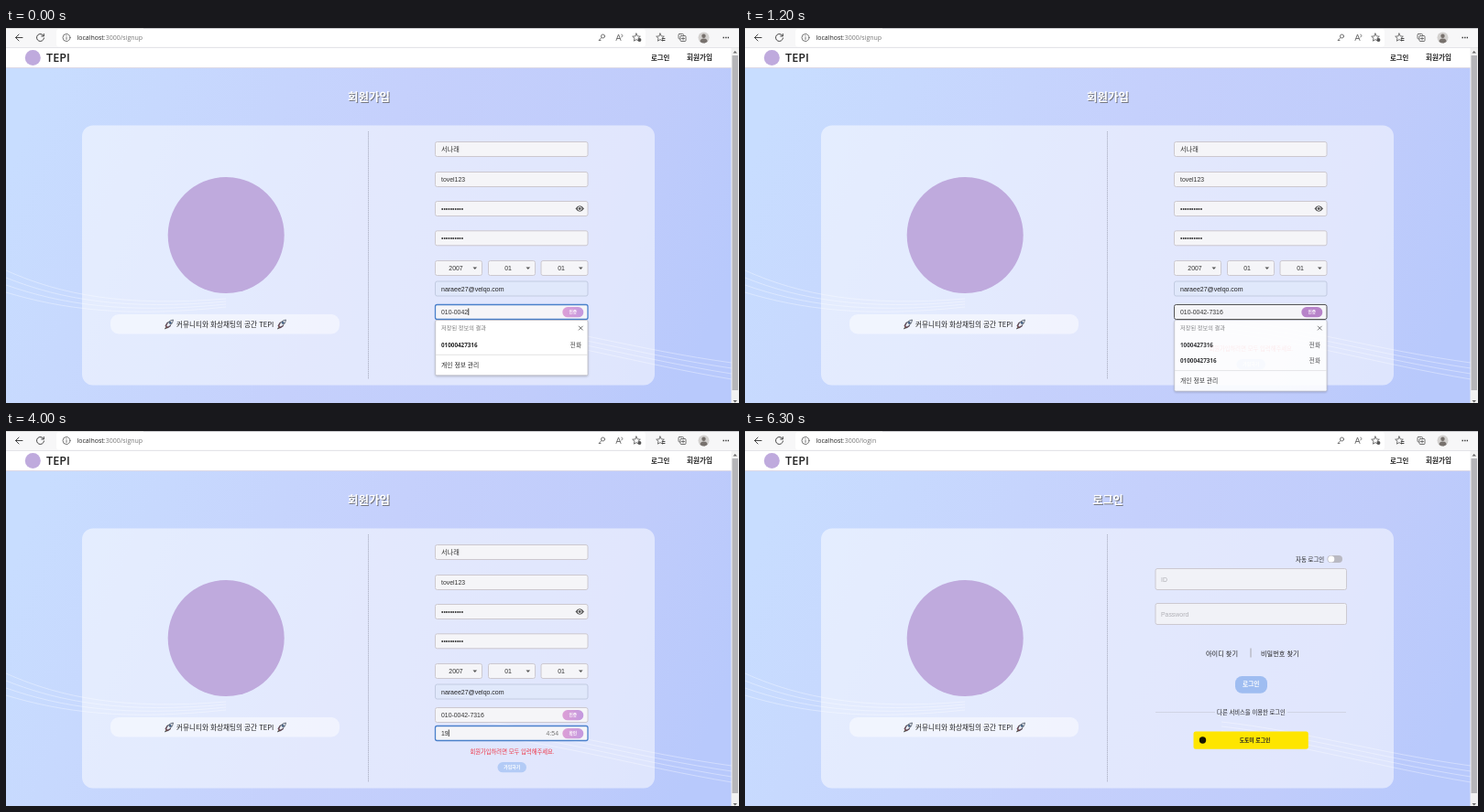
Animation, 800 px wide and 410 px high, one loop 6.4 s. Source, as an HTML page:

```html
<!DOCTYPE html>
<html lang="ko">
<head>
<meta charset="utf-8">
<title>TEPI</title>
<style>
html, body { margin: 0; width: 100%; height: 100%; overflow: hidden; background: #c4d2fc; }
svg { display: block; }
text { font-family: "Noto Sans CJK KR", "Noto Sans CJK", sans-serif; fill: #222; white-space: pre; }
.latin { font-family: "Liberation Sans", sans-serif; }
.ui { font-family: "Open Sans", sans-serif; }
.bold { font-weight: 700; }
.mid { text-anchor: middle; }
.end { text-anchor: end; }
.title { filter: drop-shadow(1px 1px .7px #555b); }
.icon { fill: none; stroke: #666; stroke-width: .9; stroke-linecap: round; stroke-linejoin: round; }
</style>
</head>
<body>
<svg width="800" height="410" viewBox="0 0 800 410">
  <defs>
    <linearGradient id="sky" x1="0" y1=".4" x2="1" y2=".6">
      <stop offset="0" stop-color="#c8ddff"/>
      <stop offset=".48" stop-color="#c5d0fc"/>
      <stop offset=".8" stop-color="#c0ccfb"/>
      <stop offset="1" stop-color="#b8c9fc"/>
    </linearGradient>
    <linearGradient id="pink" x2="1">
      <stop offset="0" stop-color="#dd9fd6"/>
      <stop offset="1" stop-color="#c399df"/>
    </linearGradient>
    <g id="rocket" stroke="#333b4a" stroke-width=".7">
      <path d="M-4 5L-1.800 1.200 0 3Z" fill="#f2a03d"/>
      <path d="M-3.500 1.500L-1.500-2H1.500L2 2-1.500 4Z" fill="#d8434e"/>
      <path d="M-2.500 1.500Q-1-4 5-5Q4 1-1.200 3Z" fill="#e9eef5"/>
      <circle cx="1.700" cy="-1.700" r="1.100" fill="#3f79b8"/>
    </g>
  </defs>

  <rect width="800" height="410" fill="url(#sky)"/>
  <g id="waves" fill="none" stroke="#fff" stroke-width=".9" opacity=".4"></g>

  <rect width="800" height="22" fill="#f7f7f8"/>
  <rect x="55" y="1" width="643" height="19.500" rx="3" fill="#fff"/>
  <rect y="22" width="800" height="21.500" fill="#fff"/>
  <path d="M0 .5H150" stroke="#ddd"/>
  <path d="M150 .5H800" stroke="#c9c9cc"/>
  <path d="M0 21.500H800" stroke="#e4e4e8"/>
  <path d="M0 43.500H792" stroke="#dcd9e6"/>
  <g class="icon">
    <path d="M18 10.500H10.500M14 7L10.500 10.500 14 14" stroke="#333"/>
    <path d="M41 8.500A4 4 0 1 0 41.500 11M41.300 6.500V9H38.800" stroke="#333"/>
    <circle cx="66" cy="10.500" r="4"/><path d="M66 10V12.500M66 8.300V8.400"/>
    <circle cx="651.500" cy="9" r="2"/><path d="M650 10.500L647 13.500H649"/>
    <path d="M666 13.500L668.500 7 671 13.500M667 11.500H670M672 7Q674 8.500 672 10"/>
    <path id="star" d="M688 6L689.300 8.900 692.300 9.200 690 11.200 690.700 14.200 688 12.600 685.300 14.200 686 11.200 683.700 9.200 686.700 8.900Z"/>
    <use href="#star" x="26"/>
    <path d="M716.500 11.500H719M716.500 13.500H719" stroke="#333"/>
    <rect x="734" y="6.500" width="5.500" height="5.500" rx="1"/>
    <rect x="736" y="8.500" width="6" height="6" rx="1" fill="#f7f7f8"/><path d="M739 10V13M737.500 11.500H740.500"/>
  </g>
  <circle cx="691.500" cy="13" r="1.900" fill="#555"/>
  <circle cx="761.500" cy="10.500" r="6" fill="#d3d1cf"/>
  <circle cx="761.500" cy="8.700" r="2.200" fill="#77716d"/>
  <path d="M757.500 15Q757.500 11.500 761.500 11.500T765.500 15Q761.500 18 757.500 15" fill="#77716d"/>
  <path d="M782.500 10.500H789" stroke="#333" stroke-width="1.400" stroke-dasharray="1.400 1.200"/>

  <circle cx="29.300" cy="32.500" r="8.500" fill="#bfaadd"/>
  <text class="ui" x="44" y="36.800" font-size="12.600" font-weight="600">TEPI</text>
  <text class="bold" x="704" y="34.700" font-size="7.400">로그인</text>
  <text class="bold" x="743" y="34.700" font-size="7.600">회원가입</text>

  <rect x="791.500" y="22" width="8.500" height="388" fill="#f1f1f1"/>
  <rect x="792.500" y="30" width="6.500" height="366" fill="#b5b5b8"/>
  <path d="M793.500 27.500L795.700 25 798 27.500ZM793.500 407L795.700 409.500 798 407Z" fill="#666"/>

  <rect x="83" y="106.500" width="625" height="284" rx="12" fill="#fff" opacity=".52"/>
  <path d="M395.500 113V384" stroke="#a7abbe" stroke-width=".8" stroke-dasharray="1.500 .7"/>
  <circle cx="240.200" cy="226.500" r="63.500" fill="#bfaadd"/>
  <rect x="114" y="313" width="250" height="21.500" rx="9" fill="#fff" opacity=".5"/>
  <use href="#rocket" x="177.500" y="324"/>
  <use href="#rocket" x="300.500" y="324"/>
  <text x="186" y="326.700" font-size="7.600">커뮤니티와 화상채팅의 공간 TEPI</text>

  <text class="ui" x="77.500" y="13" font-size="7">localhost<tspan id="path" fill="#777" style="fill:#777"></tspan></text>
  <g id="page"></g>
</svg>
<script>
const LOOP = 6400;
const PHONE = '010-0042-7316', DIGITS = '01000427316', CODE = '198919';
const PHONE_KEYS = [200, 300, 400, 500, 600];
const CODE_KEYS = [3700, 3900, 4200, 4400, 4600, 4800];
const CODE_SHOWN = 1300, CODE_FOCUS = 3200, CONFIRMED = 5300, LOGIN = 5800;

const text = (x, y, size, str, cls = '', fill = '#222') =>
  `<text x="${x}" y="${y}" font-size="${size}" class="${cls}" style="fill:${fill}">${str}</text>`;
const rect = (x, y, w, h, r, fill, more = '') =>
  `<rect x="${x}" y="${y}" width="${w}" height="${h}" rx="${r}" fill="${fill}" ${more}/>`;
const line = (d, color) => `<path d="${d}" fill="none" stroke="${color}" stroke-width=".8"/>`;
const box = (x, y, w, h, border = '#c9c5cb', fill = '#f5f5f8', width = .9) =>
  rect(x, y, w, h, 2, fill, `stroke="${border}" stroke-width="${width}"`);
const pill = (x, y, w, h, fill, label, size = 4.7) =>
  rect(x, y, w, h, h / 2, fill) +
  text(x + w / 2, y + h / 2 + size * .37, size, label, 'mid bold', '#fff');
const typed = (keys, t) => keys.filter(k => t >= k).length;

// Input row of the sign-up form: idle, hovered or focused
function field(y, str, mode = 'idle', cls = 'latin') {
  const border = { idle: '#c9c5cb', hover: '#444', focus: '#4a80cb' }[mode];
  return box(468.5, y, 166.5, 16, border, '#f5f5f8', mode == 'focus' ? 1.3 : .9) +
    text(475, y + 10.4, cls ? 6.9 : 7.2, str, cls, '#333');
}

function caret(str, y) {
  const width = [...str].reduce((sum, c) => sum + (c == '-' ? .333 : .556) * 6.9, 0);
  return line(`M${475.6 + width} ${y}v7.500`, '#111');
}

function dropdown(header, items, kind, manage, opacity) {
  const itemsEnd = 340 + items.length * 17.3;
  const bottom = manage ? itemsEnd + 22.5 : itemsEnd;
  let out = rect(468.7, 319.5, 166.3, bottom - 319.5, 1.5, '#fff',
    'stroke="#bcbcc4" stroke-width=".8" style="filter:drop-shadow(0 1px 1px #0003)"');
  out += text(manage ? 475 : 477, 330.4, 6.2, header, '', '#777');
  out += line('M625 325.800l4.600 4.600m0-4.600l-4.600 4.600', '#444');
  items.forEach((item, i) => {
    const y = 348.6 + i * 17.2;
    out += text(475, y, 6.3, item, kind ? 'ui bold' : 'ui');
    out += text(628, y, 6.6, kind, 'end', '#444');
  });
  if (manage)
    out += line(`M469 ${itemsEnd}H635`, '#ddd') + text(475, itemsEnd + 13.3, 6.8, '개인 정보 관리');
  return `<g opacity="${opacity}">${out}</g>`;
}

function suggestions(t) {
  if (t < 200) return dropdown('저장된 정보의 결과', [DIGITS], '전화', true, 1);
  if (t < 600) return dropdown('저장된 데이터', [PHONE], '', false, 1);
  const fade = Math.min(1, (1300 - t) / 110);
  return fade > 0
    ? dropdown('저장된 정보의 결과', [DIGITS.slice(1), DIGITS], '전화', true, fade) : '';
}

function codeRow(t) {
  const code = CODE.slice(0, typed(CODE_KEYS, t));
  const focused = t >= CODE_FOCUS && t < 5100;
  const left = 59 - Math.floor((Math.min(t, CONFIRMED) - CODE_SHOWN) / 500);
  return field(322.5, code, focused ? 'focus' : 'idle') +
    (code || focused ? '' : text(475, 333, 7.2, '인증번호', '', '#a3a3ab')) +
    (focused && t < 4850 ? caret(code, 326.5) : '') +
    text(603, 332.9, 6.9, '4:' + left, 'latin end', '#777') +
    pill(607.3, 325, 23, 11.3, 'url(#pink)', '확인');
}

function signup(t) {
  const dots = '•'.repeat(10);
  const phone = PHONE.slice(0, 8 + typed(PHONE_KEYS, t));
  const mode = t < 1000 ? 'focus' : t < 1700 ? 'hover' : 'idle';
  const done = t >= CONFIRMED;
  let out = text(396, 80.3, 12.5, '회원가입', 'mid bold title', '#fff');
  out += field(124.5, '서나래', 'idle', '') + field(157.5, 'tovel123');
  out += field(189.5, dots) + field(221.8, dots);
  out += '<path d="M621.500 197.500Q626.200 191 631 197.500Q626.200 204 621.500 197.500" fill="#555"/>' +
    '<circle cx="626.200" cy="197.500" r="1.900" fill="#555" stroke="#f5f5f8"/>';
  [['2007', 468.5, 491], ['01', 526.5, 548], ['01', 584, 606]].forEach(([str, x, mid]) => {
    out += box(x, 254.5, 51, 16) + text(mid, 264.8, 6.9, str, 'latin mid', '#333');
    out += `<path d="M${x + 41} 261.500h4.600l-2.300 2.400Z" fill="#555"/>`;
  });
  out += box(468.5, 277, 166.5, 16, '#bfc8de', '#e0e8fb') +
    text(475, 287.5, 7, 'naraee27@velqo.com', 'latin');
  out += field(302.5, phone, mode) + (mode == 'focus' ? caret(phone, 306.5) : '');
  out += pill(607.3, 305, 23, 11.3, mode == 'hover' ? '#b783c9' : 'url(#pink)', '인증');
  if (t >= CODE_SHOWN) out += codeRow(t);
  if (!done) out += text(552.5, 353.4, 6.3, '회원가입하려면 모두 입력해주세요.', 'mid', '#ee3344');
  out += pill(536.5, 362, 31.5, 11.3, done ? '#9dbcf2' : '#b3cbf6', '가입하기', 4.9);
  return out + suggestions(t);
}

function login() {
  let out = text(396, 80.3, 12.2, '로그인', 'mid bold title', '#fff');
  out += text(601, 142.5, 6.4, '자동 로그인');
  out += rect(635.5, 136, 16.5, 8, 4, '#b9b9c2') + '<circle cx="639.800" cy="140" r="3.500" fill="#fff"/>';
  [['ID', 150.5], ['Password', 188.5]].forEach(([label, y]) => {
    out += box(448, y, 208.5, 23, '#c9c6cc', '#f1f2f7') + text(454, y + 14, 6.9, label, 'latin', '#b0b0b6');
  });
  out += text(503, 245.6, 7.2, '아이디 찾기') + line('M552 237.500V247.500', '#999') +
    text(563, 245.6, 7.2, '비밀번호 찾기');
  out += rect(535, 268, 35, 18.7, 7.5, '#9fbdf1') + text(552.3, 279.4, 6.7, '로그인', 'mid bold', '#fff');
  out += line('M448 307.500H513M592 307.500H656', '#ccd0df') +
    text(552.5, 310.2, 6.3, '다른 서비스을 이용한 로그인', 'mid');
  out += rect(489.5, 328.5, 125.3, 19.2, 2.5, '#fee500') + '<circle cx="499.500" cy="338" r="3.700" fill="#181600"/>';
  return out + text(556.5, 340.3, 5.8, '도토미 로그인', 'mid bold');
}

document.getElementById('waves').innerHTML = Array.from({ length: 4 }, (_, i) =>
  `<path d="M0 ${265 + i * 8}C60 ${292 + i * 5} 130 ${305 + i * 4} 240 ${296 + i * 3}"/>` +
  `<path d="M520 ${318 + i * 5}C610 ${328 + i * 5} 690 ${352 + i * 5} 792 ${366 + i * 6}"/>`).join('');

const page = document.getElementById('page');
const path = document.getElementById('path');
const start = performance.now();
let shown = '';

function draw() {
  const t = (performance.now() - start) % LOOP, onLogin = t >= LOGIN;
  const markup = onLogin ? login() : signup(t);
  if (markup != shown) {
    page.innerHTML = shown = markup;
    path.textContent = onLogin ? ':3000/login' : ':3000/signup';
  }
  requestAnimationFrame(draw);
}
draw();
</script>
</body>
</html>
```
